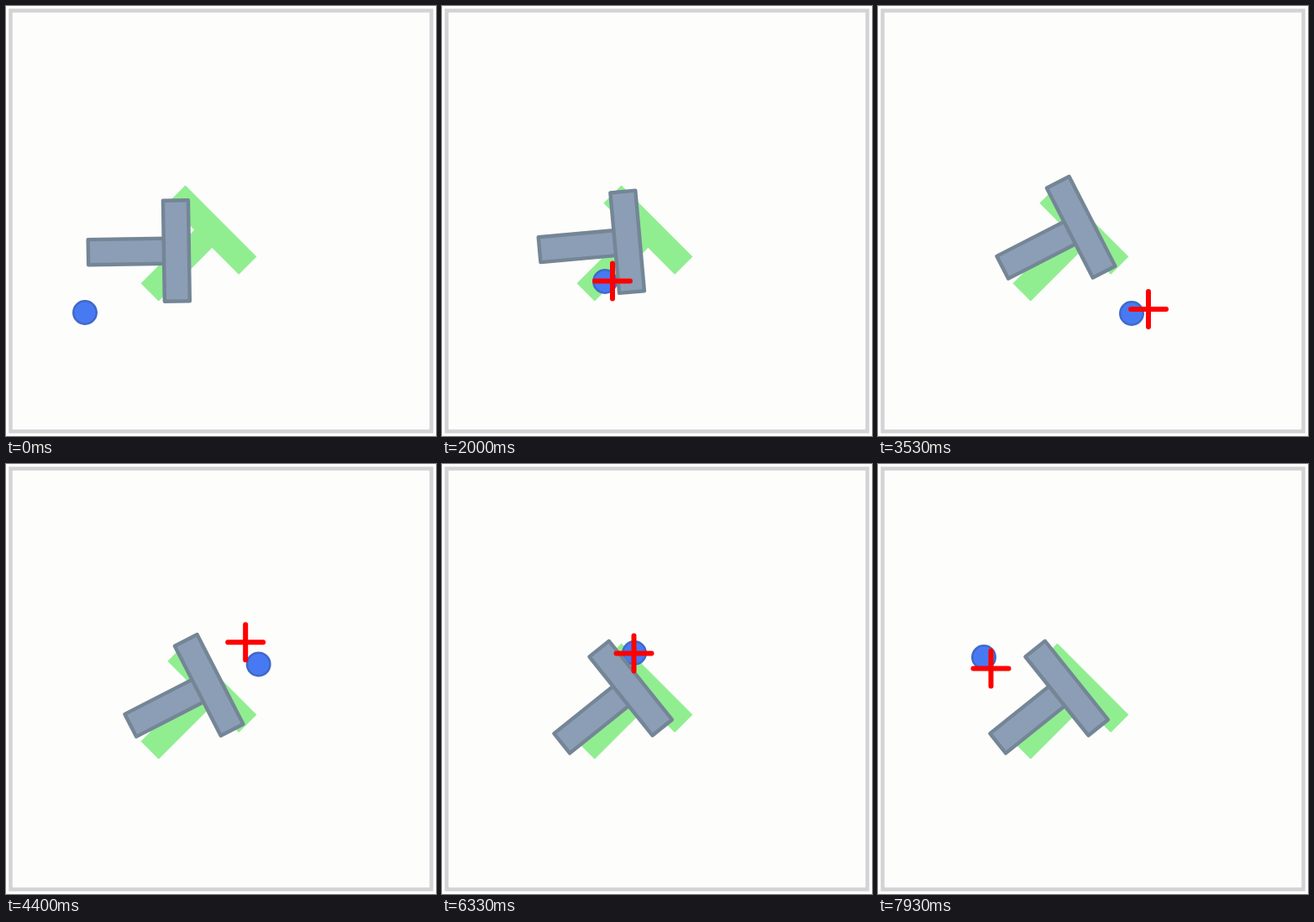
These frames come from a looping animation (512x512 px, 8000 ms). An HTML page with a canvas:

```html
<!DOCTYPE html>
<html lang="en">
<head>
<meta charset="utf-8">
<title>Pushing a T block</title>
<style>
html, body { margin: 0; width: 100%; height: 100%; overflow: hidden; background: #fdfdfc; }
canvas { display: block; width: 512px; height: 512px; }
</style>
</head>
<body>
<canvas id="stage" width="512" height="512"></canvas>
<script>
const ctx = document.getElementById('stage').getContext('2d');
const LOOP = 8000;
const LEAD = 2; // steps by which the cross runs ahead of the pusher
const GOAL = [256, 256, 45];
const START = [217.9, 291.3, 89.1];

// Turning points of the pusher's path: [step, x, y]
const path = [
  [0, 94, 365], [3, 92, 362], [6, 112, 328], [9, 129, 307], [11, 141, 314],
  [13, 149.5, 318.5], [20, 194, 328], [22, 203, 327.5], [28, 240, 331],
  [32, 266, 379], [35, 302, 366], [37, 322, 361], [40, 328, 317], [45, 293, 223],
  [49, 263, 199], [53, 253.5, 209.5], [55, 250.5, 212.5], [63, 229, 225],
  [65, 228.5, 225.5], [70, 209, 172], [72, 176, 162], [74, 124, 175],
  [76, 112, 205], [79, 126, 230], [81, 134.5, 243.5]
];

// Each push moves the block to a new pose (x, y, degrees)
const pushes = [
  { from: 6.5, to: 9.5, pose: [218, 290.8, 99.4] },
  { from: 15, to: 20, pose: [235.6, 279.5, 84.9] },
  { from: 20, to: 28, pose: [255, 256.4, 62.8] },
  { from: 54.5, to: 62.5, pose: [236.4, 257.6, 51.3] }
];

const clamp01 = u => Math.min(1, Math.max(0, u));

// Cubic through the path, slopes taken from the neighbours
function pathAt(step) {
  let i = 0;
  while (i < path.length - 2 && step >= path[i + 1][0]) i++;
  const a = path[i], b = path[i + 1];
  const prev = path[i - 1] || a, next = path[i + 2] || b;
  const span = b[0] - a[0], u = (step - a[0]) / span;
  return [1, 2].map(k => {
    const ma = span * (b[k] - prev[k]) / (b[0] - prev[0]);
    const mb = span * (next[k] - a[k]) / (next[0] - a[0]);
    const d = b[k] - a[k];
    return a[k] + u * (ma + u * (3 * d - 2 * ma - mb + u * (ma + mb - 2 * d)));
  });
}

function blockAt(step) {
  return pushes.reduce((pose, push) => {
    const u = clamp01((step - push.from) / (push.to - push.from));
    return pose.map((v, k) => v + (push.pose[k] - v) * u);
  }, START);
}

function drawTee([x, y, deg], fill, outline) {
  ctx.save();
  ctx.translate(x, y);
  ctx.rotate(deg * Math.PI / 180);
  ctx.fillStyle = fill;
  ctx.lineWidth = 4.4;
  ctx.lineJoin = 'round';
  for (const part of [[-15, 28, 30, 92], [-60, 0, 120, 30]]) {
    ctx.fillRect(...part);
    if (outline) {
      ctx.strokeStyle = outline;
      ctx.strokeRect(...part);
    }
  }
  ctx.restore();
}

function drawPusher([x, y]) {
  ctx.beginPath();
  ctx.arc(x, y, 13.7, 0, Math.PI * 2);
  ctx.fillStyle = '#477af2';
  ctx.fill();
  ctx.lineWidth = 2.6;
  ctx.strokeStyle = '#4169c8';
  ctx.stroke();
}

function drawCross([x, y]) {
  ctx.beginPath();
  ctx.moveTo(x - 21, y);
  ctx.lineTo(x + 21, y);
  ctx.moveTo(x, y - 21);
  ctx.lineTo(x, y + 21);
  ctx.lineWidth = 6;
  ctx.lineCap = 'round';
  ctx.strokeStyle = '#ff0000';
  ctx.stroke();
}

function draw(step) {
  ctx.fillStyle = '#fdfdfc';
  ctx.fillRect(0, 0, 512, 512);
  ctx.lineWidth = 4.5;
  ctx.strokeStyle = '#d3d3d6';
  ctx.strokeRect(5.5, 5.5, 501, 501);
  drawTee(GOAL, '#90ee90');
  drawPusher(pathAt(step));
  drawTee(blockAt(step), '#8b9eb5', '#748696');
  if (step > 0) drawCross(pathAt(step + LEAD));
}

// Steps alternate between 130 ms and 70 ms
function stepAt(ms) {
  return 2 * Math.floor(ms / 200) + (ms % 200 >= 130 ? 1 : 0);
}

const start = performance.now();
function tick() {
  draw(stepAt((performance.now() - start) % LOOP));
  requestAnimationFrame(tick);
}
tick();
</script>
</body>
</html>
```
